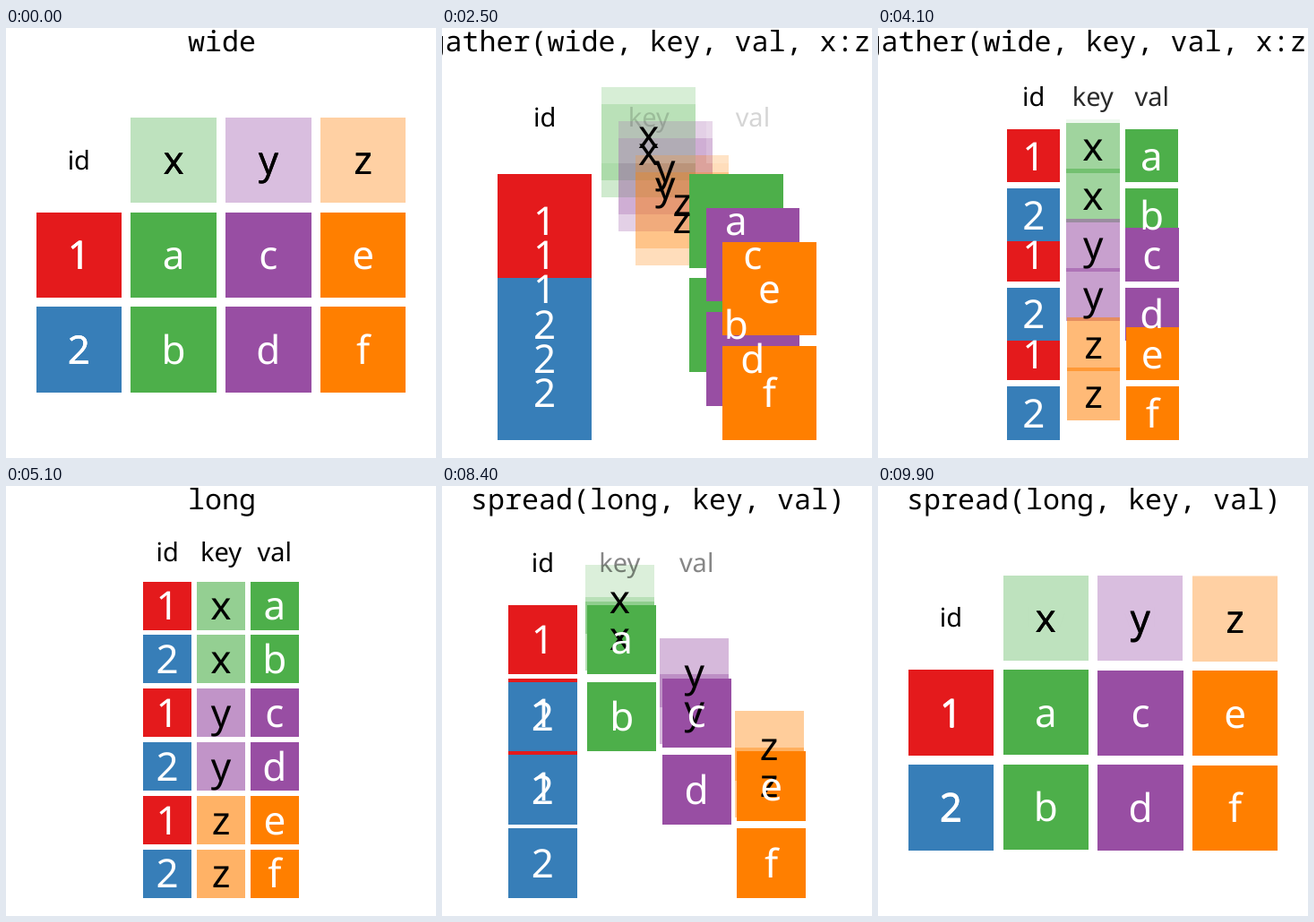
An HTML page that plays this animation: 480 px wide and 480 px high, repeating every 10 s.

```html
<!DOCTYPE html>
<html lang="en">
<head>
<meta charset="utf-8">
<title>wide and long</title>
<style>
  html, body { margin: 0; width: 100%; height: 100%; overflow: hidden; background: #fff; }
  svg { display: block; width: 100vw; height: 100vh; }
  rect { shape-rendering: crispEdges; }
  text { text-anchor: middle; font-family: "Noto Sans", "Open Sans", sans-serif; text-rendering: geometricPrecision; }
  #title { font: 31.67px "Noto Sans Mono", "DejaVu Sans Mono", monospace; white-space: pre; }
</style>
</head>
<body>
<svg viewBox="0 0 480 480">
  <g id="tiles"></g>
  <g id="labels"></g>
  <text id="title" x="241" y="26"></text>
</svg>
<script>
const NS = "http://www.w3.org/2000/svg";
const RED = "#e41a1c", BLUE = "#377eb8", GREEN = "#4daf4a", PURPLE = "#984ea3", ORANGE = "#ff7f00";
const CELL = 44, HEAD = 29;
const TILE = 0.9;                    // tile side in grid units
const CX = 240, CY = 253.2, SPAN = 412.6;
const STEP = 100, FRAMES = 100;

const tiles = document.getElementById("tiles");
const labels = document.getElementById("labels");
const title = document.getElementById("title");
const items = [];

function make(parent, tag, attrs) {
  const el = document.createElementNS(NS, tag);
  for (const k in attrs) el.setAttribute(k, attrs[k]);
  return parent.appendChild(el);
}

// wide and long are [column, row, tile opacity, label opacity]
function add(label, fill, ink, size, wide, long) {
  const rect = make(tiles, "rect", { fill });
  const text = make(labels, "text", { fill: ink, "font-size": size });
  text.textContent = label;
  const item = { rect, text, size, wide, long };
  items.push(item);
  return item;
}

[RED, BLUE].forEach((fill, k) => {
  for (let j = 0; j < 3; j++)
    add(k + 1, fill, "#fff", CELL, [1, k + 1, 1, 1], [1, 2 * j + k + 1, 1, 1]);
});

const groups = [["x", GREEN, "ab"], ["y", PURPLE, "cd"], ["z", ORANGE, "ef"]];

groups.forEach(([name, fill], j) => {
  for (let k = 1; k <= 2; k++)
    add(name, fill, "#000", CELL, [j + 2, 0, 0.2, 1], [2, 2 * j + k, 0.6, 1]);
});

["id", "key", "val"].forEach((name, j) => {
  const seen = j ? 0 : 1;
  add(name, "#fff", "#000", HEAD, [j + 1, 0, seen, seen], [j + 1, 0, 1, 1]);
});

let corner;                          // the last cell bounds the view
groups.forEach(([, fill, values], j) => {
  [...values].forEach((v, k) => {
    corner = add(v, fill, "#fff", CELL, [j + 2, k + 1, 1, 1], [3, 2 * j + k + 1, 1, 1]);
  });
});

const sineInOut = p => (1 - Math.cos(Math.PI * p)) / 2;
const expOut = p => p >= 1 ? 1 : 1 - 2 ** (-10 * p);
const mix = (a, b, t) => a + (b - a) * t;

function stateAt(n) {
  if (n < 17) return ["wide", "wide", "long", 0];
  if (n < 51) return ["gather(wide, key, val, x:z)", "wide", "long", (n - 16) / 34];
  if (n < 68) return ["long", "long", "wide", 0];
  return ["spread(long, key, val)", "long", "wide", (n - 67) / 33];
}

function draw(n) {
  const [caption, from, to, p] = stateAt(n);
  const ex = expOut(p), ey = sineInOut(p);
  const pose = item => item[from].map((v, k) => mix(v, item[to][k], k ? ey : ex));

  const [maxCol, maxRow] = pose(corner);
  const unit = SPAN / (Math.max(maxCol - 1, maxRow) + TILE);
  const side = unit * TILE;

  title.textContent = caption;
  for (const item of items) {
    const [col, row, tileAlpha, textAlpha] = pose(item);
    const x = CX + unit * (col - (maxCol + 1) / 2);
    const y = CY + unit * (row - maxRow / 2);
    const { rect, text } = item;
    rect.setAttribute("x", x - side / 2);
    rect.setAttribute("y", y - side / 2);
    rect.setAttribute("width", side);
    rect.setAttribute("height", side);
    rect.setAttribute("fill-opacity", tileAlpha);
    text.setAttribute("x", x);
    text.setAttribute("y", y + item.size * 0.36);
    text.setAttribute("fill-opacity", textAlpha);
  }
}

const start = performance.now();
let shown = 0;

function tick() {
  const n = Math.floor((performance.now() - start) / STEP) % FRAMES;
  if (n !== shown) draw(shown = n);
  requestAnimationFrame(tick);
}

draw(0);
requestAnimationFrame(tick);
</script>
</body>
</html>
```
